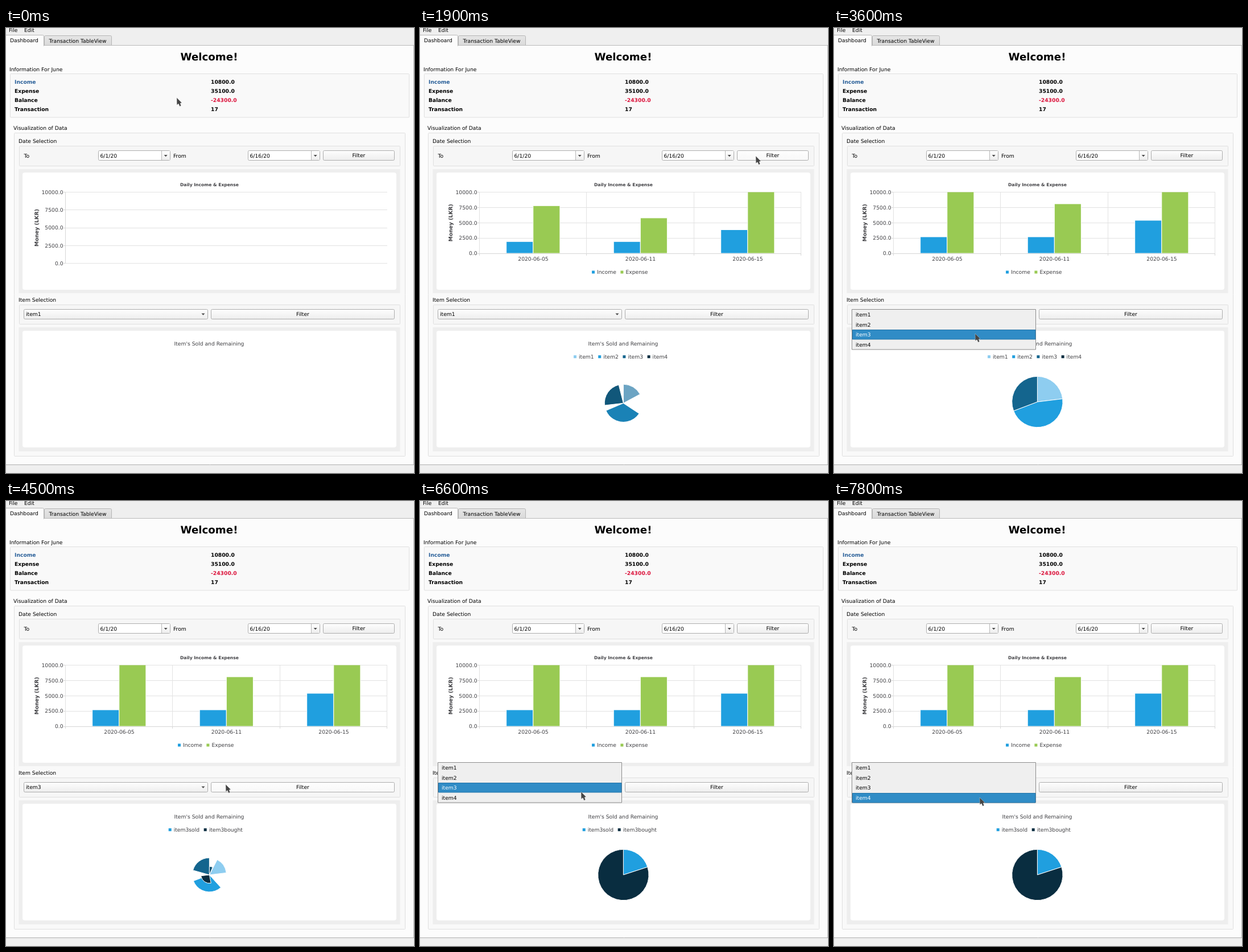
These frames come from a looping animation (717 by 782 pixels, 8 s). An HTML page with a canvas:

```html
<!DOCTYPE html>
<html lang="en">
<head>
<meta charset="utf-8">
<title>Dashboard</title>
<style>
html, body { margin: 0; height: 100%; overflow: hidden; background: #fcfcfc; }
canvas { display: block; }
</style>
</head>
<body>
<canvas id="stage" width="717" height="782"></canvas>
<script>
const ctx = document.getElementById('stage').getContext('2d');
const INK = '#000', GRAY = '#404044', NAVY = [9, 45, 64];
const LIGHT = [142, 205, 240], BLUE = [32, 159, 223], TEAL = [20, 101, 142], GREEN = [153, 202, 83];
const CHART_START = 1631, PIE_START = 1612, ITEM_START = 4405;

// Pointer moves: begin, end, destination
const MOVES = [
  [700, 1100, 590, 225], [2200, 2500, 262, 487], [3100, 3600, 248, 537], [3900, 4500, 386, 498],
  [4800, 5200, 298, 509], [5900, 6100, 284, 514], [6500, 6600, 283, 511], [7500, 7800, 256, 521]
];

const rgb = c => `rgb(${c.join()})`;
const clamp = (v, lo, hi) => Math.min(hi, Math.max(lo, v));
const mix = (a, b, p) => a + (b - a) * p;
const smooth = p => p * p * (3 - 2 * p);
const outQuart = (t, start) => 1 - (1 - clamp((t - start) / 1000, 0, 1)) ** 4;
const within = (t, a, b) => t >= a && t < b;

function pointerAt(t) {
  let x = 300, y = 122.5;
  for (const [begin, end, toX, toY] of MOVES) {
    const p = smooth(clamp((t - begin + 100) / (end - begin + 100), 0, 1));
    x = mix(x, toX, p);
    y = mix(y, toY, p);
  }
  return [x, y];
}

function box(x, y, w, h, fill, stroke, r = 0) {
  ctx.beginPath();
  ctx.roundRect(x, y, w, h, r);
  ctx.fillStyle = fill;
  ctx.fill();
  if (stroke) {
    ctx.strokeStyle = stroke;
    ctx.lineWidth = 1;
    ctx.stroke();
  }
}

function line(x1, y1, x2, y2, color) {
  ctx.beginPath();
  ctx.moveTo(x1, y1);
  ctx.lineTo(x2, y2);
  ctx.strokeStyle = color;
  ctx.lineWidth = 1;
  ctx.stroke();
}

// Draws a label and returns its width
function text(s, x, y, { color = INK, size = 9.2, bold = false, align = 'left' } = {}) {
  ctx.font = `${bold ? 'bold ' : ''}${size}px "DejaVu Sans", sans-serif`;
  ctx.textRendering = 'geometricPrecision';
  ctx.textAlign = align;
  ctx.fillStyle = color;
  ctx.fillText(s, x, y);
  return ctx.measureText(s).width;
}

function poly(points, fill) {
  ctx.beginPath();
  points.forEach(([x, y]) => ctx.lineTo(x, y));
  ctx.closePath();
  ctx.fillStyle = fill;
  ctx.fill();
}

const arrow = (x, y) => poly([[x - 3, y - 1.5], [x + 3, y - 1.5], [x, y + 1.7]], '#4a4a4a');

function shade(y, h, top, bottom) {
  const g = ctx.createLinearGradient(0, y, 0, y + h);
  g.addColorStop(0, top);
  g.addColorStop(1, bottom);
  return g;
}

function button(x, y, w, label, [px, py] = [], pressed) {
  const hover = within(px, x, x + w) && within(py, y, y + 18);
  const fill = pressed ? '#dcdcdc' : shade(y, 17, '#fefefe', hover ? '#f8f8f8' : '#eeeeee');
  box(x + .5, y + .5, w - 1, 17, fill, '#adadad', 2);
  if (label) text(label, x + w / 2, y + 12.2, { align: 'center' });
}

function dateEdit(x, value) {
  box(x + .5, 215.5, 126, 17, '#fff', '#adadad', 2);
  box(x + 112, 216, 14, 16, shade(216, 16, '#fefefe', '#eeeeee'));
  line(x + 111.5, 216, x + 111.5, 232, '#b8b8b8');
  arrow(x + 118.7, 224.5);
  text(value, x + 3.5, 228);
}

const group = (x, y, w, h, fill) => box(x + .5, y + .5, w, h, fill, '#dfdfdf', 1);

function chartPanel(y, h) {
  box(22.5, y, 670, 218, '#eeeeee');
  box(29, y + 6, 657, h, '#fff', null, 4);
}

function frameUi(t, mouse) {
  box(0, 0, 717, 782, '#fcfcfc');
  box(0, 0, 717, 31, '#efefef');
  text('File', 5, 7);
  text('Edit', 32, 7);
  box(67.5, 13.5, 118, 17, shade(13, 18, '#e6e6e6', '#dadada'), '#b5b5b5', [2, 2, 0, 0]);
  line(67, 30.5, 717, 30.5, '#b9b9b9');
  box(-.5, 12.5, 67, 19, '#fcfcfc', '#b9b9b9', [0, 2, 0, 0]);
  box(0, 30, 66, 3, '#fcfcfc');
  text('Dashboard', 7, 25.2);
  text('Transaction TableView', 75.5, 26);
  line(716.5, 31, 716.5, 767, '#b9b9b9');
  box(0, 768, 717, 14, '#efefef');
  line(0, 767.5, 717, 767.5, '#b0b0b0');

  text('Welcome!', 357, 57, { size: 18.2, bold: true, align: 'center' });
  text('Information For June', 6, 76);
  group(7, 80, 701, 76.5, '#f9f9f9');
  [['Income', '10800.0', '#2a6099', INK], ['Expense', '35100.0', INK, INK],
   ['Balance', '-24300.0', INK, '#dc143c'], ['Transaction', '17', INK, INK]]
    .forEach(([name, value, c1, c2], i) => {
      const y = 98.3 + 16 * i;
      text(name, 15, y, { bold: true, color: c1 });
      text(value, 360, y, { bold: true, color: c2 });
    });

  text('Visualization of Data', 13, 179.3);
  group(14, 184, 687, 568, '#f9f9f9');
  text('Date Selection', 22, 202.3);
  group(23, 207, 669, 35, '#f6f6f6');
  text('To', 31.5, 228);
  dateEdit(162, '6/1/20');
  text('From', 294, 228);
  dateEdit(425, '6/16/20');
  button(557, 215, 126, 'Filter', mouse, t === 1500);
  chartPanel(248, 206);

  text('Item Selection', 22, 481.3);
  group(23, 486, 669, 34, '#f6f6f6');
  button(31, 494, 324);
  text(t < 3800 ? 'item1' : 'item3', 35, 506.3);
  arrow(346.5, 503);
  button(360, 494, 323, 'Filter', mouse, within(t, 4300, 4500));
  chartPanel(526, 205);
}

function legend(x, y, entries) {
  for (const [label, color] of entries) {
    box(x, y - 5.5, 5, 5, rgb(color));
    x += 16.6 + text(label, x + 9, y, { color: GRAY });
  }
}

function barChart(t) {
  const loaded = t > CHART_START, p = outQuart(t, CHART_START);
  const top = 288.5, height = loaded ? 107.5 : 125, base = top + height;
  text('Daily Income & Expense', 357.5, 278, { size: 7.6, bold: true, align: 'center', color: GRAY });
  for (let i = 0; i < 5; i++) {
    const y = top + height * i / 4, row = Math.floor(y) + .5;
    line(104, row, 670, row, '#e2e2e2');
    line(101, row, 104, row, '#d6d6d6');
    text((10000 - 2500 * i).toFixed(1), 100.5, y + 3.3, { align: 'right', color: GRAY });
  }
  line(104.5, top, 104.5, base, '#d6d6d6');
  ctx.save();
  ctx.translate(56.5, top + height / 2);
  ctx.rotate(-Math.PI / 2);
  text('Money (LKR)', 0, 0, { bold: true, align: 'center', color: GRAY });
  ctx.restore();
  if (!loaded) return;

  for (let i = 0; i < 4; i++) {
    const x = Math.floor(104 + 188.6 * i) + .5;
    line(x, top, x, base, '#e2e2e2');
    line(x, base, x, base + 4, '#d6d6d6');
  }
  ctx.save();
  ctx.beginPath();
  ctx.rect(104, top, 566, height);
  ctx.clip();
  const data = [[2700, 10900], [2700, 8100], [5400, 16100]];
  data.forEach((pair, i) => pair.forEach((value, k) => {
    const h = value * p / 10000 * height;
    box(151.7 + 188.5 * i + 47.1 * k, base - h, 47.1, h, rgb(k ? GREEN : BLUE), '#fff');
  }));
  ctx.restore();
  line(104, 396.5, 670, 396.5, '#d6d6d6');
  ['05', '11', '15'].forEach((d, i) =>
    text('2020-06-' + d, 199 + 188.5 * i, 409, { align: 'center', color: GRAY }));
  legend(302, 432, [['Income', BLUE], ['Expense', GREEN]]);
}

// Angles in degrees, clockwise from the top
function slice(start, span, r, cy, color) {
  if (r < .5 || span < .1) return;
  const a = (start - 90) * Math.PI / 180;
  ctx.beginPath();
  ctx.moveTo(357.4, cy);
  ctx.arc(357.4, cy, r, a, a + span * Math.PI / 180);
  ctx.closePath();
  ctx.fillStyle = rgb(color);
  ctx.fill();
  ctx.strokeStyle = '#fff';
  ctx.lineWidth = 1;
  ctx.stroke();
}

// Final angles, and the angle a slice opens from: its middle at the moment it joined the pie
function layout(parts) {
  const total = parts.reduce((sum, [v]) => sum + v, 0);
  let before = 0;
  return parts.map(([v, color]) => {
    const from = before && (before + v / 2) / (before + v) * 360;
    const s = { from, start: before / total * 360, span: v / total * 360, color };
    before += v;
    return s;
  });
}

function growPie(slices, p, cy) {
  for (const { from, start, span, color } of slices)
    slice(mix(from, start, p), span * p, 44.7 * p, cy, color.map((c, i) => mix(NAVY[i], c, p)));
}

function shrinkPie(slices, p, cy) {
  for (const { start, span, color } of slices)
    slice(start + span * p, span * (1 - p), 44.7 * (1 - p), cy, color);
}

function pieChart(t) {
  text("Item's Sold and Remaining", 357, 557.5, { align: 'center', color: GRAY });
  if (t < PIE_START) return;
  const items = layout([[3, LIGHT], [6, BLUE], [4, TEAL]]);
  if (t < ITEM_START) {
    const p = outQuart(t, PIE_START);
    legend(270, 580.7, [LIGHT, BLUE, TEAL, NAVY].map((c, i) => ['item' + (i + 1), c]));
    growPie(items, p, 657 + 9 * (1 - p));
  } else {
    const p = outQuart(t, ITEM_START);
    legend(285.7, 580.7, [['item3sold', BLUE], ['item3bought', NAVY]]);
    shrinkPie(items, p, 657);
    growPie(layout([[1, BLUE], [4, NAVY]]), p, 657);
  }
}

function popup(top, pointerY) {
  const row = 17.6;
  const active = clamp(Math.floor((pointerY - top - .5) / row), 0, 3);
  box(31.5, top + .5, 323, 70.5, '#efefef', '#8c8c8c');
  for (let i = 0; i < 4; i++) {
    const y = top + 1 + row * i, on = i === active;
    if (on) box(32.5, Math.round(y) + .5, 321.5, 16.5, '#308cc6', '#2374a9');
    text('item' + (i + 1), 38, y + 12, { color: on ? '#fff' : INK });
  }
}

function pointer(x, y) {
  const shape = [[0, 0], [.3, 12.8], [3.2, 10.6], [5.3, 15.2], [7.7, 14], [6.1, 9.8], [9, 9]];
  poly(shape.map(([dx, dy]) => [x + dx, y + dy]), '#454545');
  ctx.strokeStyle = 'rgba(255,255,255,.6)';
  ctx.lineWidth = .5;
  ctx.stroke();
}

function draw(now) {
  const t = Math.floor(now % 8000 / 100) * 100;
  const mouse = pointerAt(t);
  frameUi(t, mouse);
  barChart(t);
  pieChart(t);
  if (within(t, 2800, 3800)) popup(494, mouse[1]);
  if (within(t, 5600, 6900) || t >= 7400) popup(459, mouse[1]);
  pointer(...mouse);
}

let origin;
function tick(now) {
  origin ??= now;
  draw(now - origin);
  requestAnimationFrame(tick);
}
requestAnimationFrame(tick);
</script>
</body>
</html>
```
